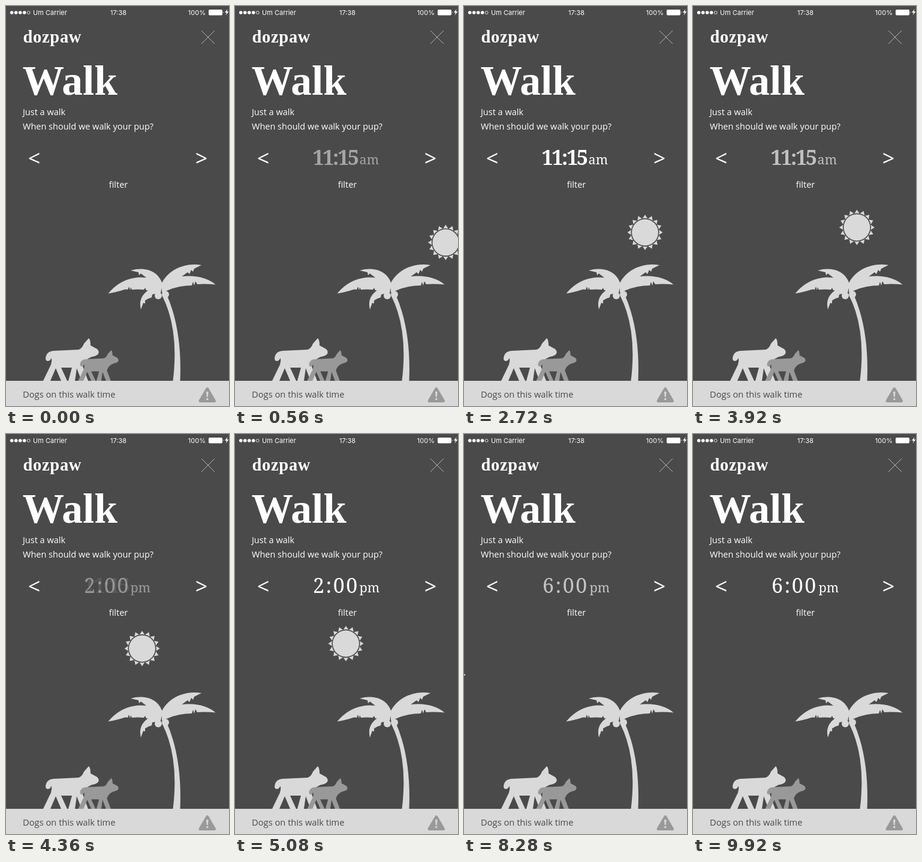
Animation of 372x667 px, one loop 10 s. Source, as an HTML page:

```html
<!DOCTYPE html>
<html lang="en">
<head>
<meta charset="utf-8">
<title>Walk</title>
<style>
html, body { margin: 0; width: 100%; height: 100%; overflow: hidden; background: #4a4a4a; }
svg { display: block; width: 372px; height: 667px; }
text { font-family: "Open Sans", sans-serif; font-size: 14.5px; font-weight: 500; fill: #fff; }
.status text { font-family: Inter, sans-serif; font-size: 11px; font-weight: 400; }
.title { font-family: "Liberation Serif", serif; font-weight: bold; }
.arrow { font-size: 36px; font-weight: 400; text-anchor: middle; }
.time text { font-family: "Noto Serif", serif; font-size: 34px; }
.time text.half { font-size: 21.6px; font-weight: 400; }
</style>
</head>
<body>
<svg viewBox="0 0 372 667">
  <defs>
    <path id="dog" d="M138 554Q141 556 141 566L152 572Q156 576 154 580Q151 584 143 585Q132 589 128 601L137 625H126L118 604L115 625H104L110 603H92L102 625H92L83 604L74 625H62L75 598Q77 592 76 587L73 591Q67 594 66 588Q67 576 79 575L121 573Q127 571 130 563Z"/>
  </defs>
  <rect width="372" height="667" fill="#4a4a4a"/>

  <g class="status" fill="#fff">
    <circle cx="9.7" cy="11" r="2.8"/><circle cx="16.7" cy="11" r="2.8"/>
    <circle cx="23.7" cy="11" r="2.8"/><circle cx="30.7" cy="11" r="2.8"/>
    <circle cx="37.7" cy="11" r="2.4" fill="none" stroke="#fff" stroke-width=".8"/>
    <text x="45" y="15">Um Carrier</text>
    <text x="187.5" y="15" text-anchor="middle">17:38</text>
    <text x="333" y="15" text-anchor="end">100%</text>
    <rect x="338" y="6" width="23" height="9.5" rx="2"/>
    <path d="M362 9q1.5 1.5 0 3.5zM369.5 5L365 11H368L366.5 15.5L371.5 9.3H368.5Z"/>
  </g>

  <text class="title" x="28.5" y="60.5" style="font-size:28.5px;letter-spacing:.7px">dozpaw</text>
  <path d="M326 41L348 63M348 41L326 63" stroke="#b4b4b4"/>
  <text class="title" x="27.5" y="148" style="font-size:69.5px">Walk</text>
  <text x="28" y="182">Just a walk</text>
  <text x="28" y="206">When should we walk your pup?</text>
  <text class="arrow" x="47" y="267">&lt;</text>
  <text class="arrow" x="326" y="267">&gt;</text>
  <text x="187.5" y="303" text-anchor="middle">filter</text>

  <g class="time" opacity="0">
    <text x="129.5" y="264.5" style="letter-spacing:-2.2px;font-weight:600">11:15</text>
    <text class="half" x="207.5" y="264">am</text>
  </g>
  <g class="time" opacity="0">
    <text x="130" y="264.5" style="letter-spacing:2.5px">2:00</text>
    <text class="half" x="207.5" y="264">pm</text>
  </g>
  <g class="time" opacity="0">
    <text x="131" y="264.5" style="letter-spacing:2.5px">6:00</text>
    <text class="half" x="209.5" y="264">pm</text>
  </g>

  <g id="sun" fill="#d9d9d9"><circle r="22"/></g>

  <g fill="#d9d9d9">
    <path d="M261 484Q289 540 278.5 625H290.5Q294 540 268 481Z"/>
    <circle cx="254" cy="483" r="6"/><circle cx="266" cy="481" r="6"/>
    <path d="M262 465C246 449 200 443 170.5 479.5C195 475 198 471 203 473L205 468L207 474L208 469L210 473Q220 472 230 473L232 470L234 474Q246 475 256 477Z"/>
    <path d="M261 464C255 442 232 434 208 441L221 444L222 449L225 446Q237 455 250 466Z"/>
    <path d="M259 464C270 439 300 427 326 432L314 438L312 443L309 440L306 447L303 444Q288 455 270 467Z"/>
    <path d="M260 465C285 444 330 447 349.5 464.5Q333 463 319 464L316 459L314 466L312 460L310 466Q289 466 270 474L260 478Z"/>
    <path d="M261 466C239 468 219 482 225 506L229 495L232 496V491Q238 487 243 486L244 481Q252 479 258 478Z"/>
    <use href="#dog"/>
    <use href="#dog" fill="#999" transform="translate(75.5 175) scale(.725 .72)"/>
    <rect y="625" width="372" height="42"/>
  </g>
  <text x="28" y="653" style="font-size:14.7px;fill:#4a4a4a">Dogs on this walk time</text>
  <path d="M335.8 638.5L347.5 658.5H324.1Z" fill="#999" stroke="#999" stroke-width="5" stroke-linejoin="round"/>
  <path d="M334 643h3.6l-.8 9h-2z" fill="#d9d9d9"/>
  <circle cx="335.8" cy="655.5" r="1.7" fill="#d9d9d9"/>
</svg>
<script>
const sun = document.querySelector('#sun');
const times = document.querySelectorAll('.time');
const LOOP = 10000, MOVE = 1110;
const starts = [0, 3650, 7390];
const stops = [402, 302, 185, -79];

for (let i = 0; i < 16; i++) {
  const ray = document.createElementNS('http://www.w3.org/2000/svg', 'path');
  ray.setAttribute('d', 'M-4.2 -23.2Q0 -24.2 4.2 -23.2L0 -29.5Z');
  ray.setAttribute('transform', `rotate(${i * 22.5})`);
  sun.append(ray);
}

const clamp = v => Math.min(1, Math.max(0, v));

// The sky path is highest at x = 185 and drops away on both sides.
function skyY(x) {
  const d = Math.abs(x - 185);
  return 349.5 + (x > 185 ? .168 * d + .00061 * d * d : .1316 * d + .000536 * d * d);
}

function draw(t) {
  const p = starts.map(s => clamp((t - s) / MOVE));
  const x = p.reduce((sum, v, i) => sum + v * (stops[i + 1] - stops[i]), stops[0]);
  sun.setAttribute('transform', `translate(${x} ${skyY(x)})`);
  times.forEach((el, i) => {
    const fadeIn = i ? clamp((p[i] - .4) / .6) : p[0];
    const fadeOut = i < 2 ? clamp(1 - p[i + 1] / .7) : 1;
    el.setAttribute('opacity', fadeIn * fadeOut);
  });
}

function tick() {
  draw(performance.now() % LOOP);
  requestAnimationFrame(tick);
}
tick();
</script>
</body>
</html>
```
